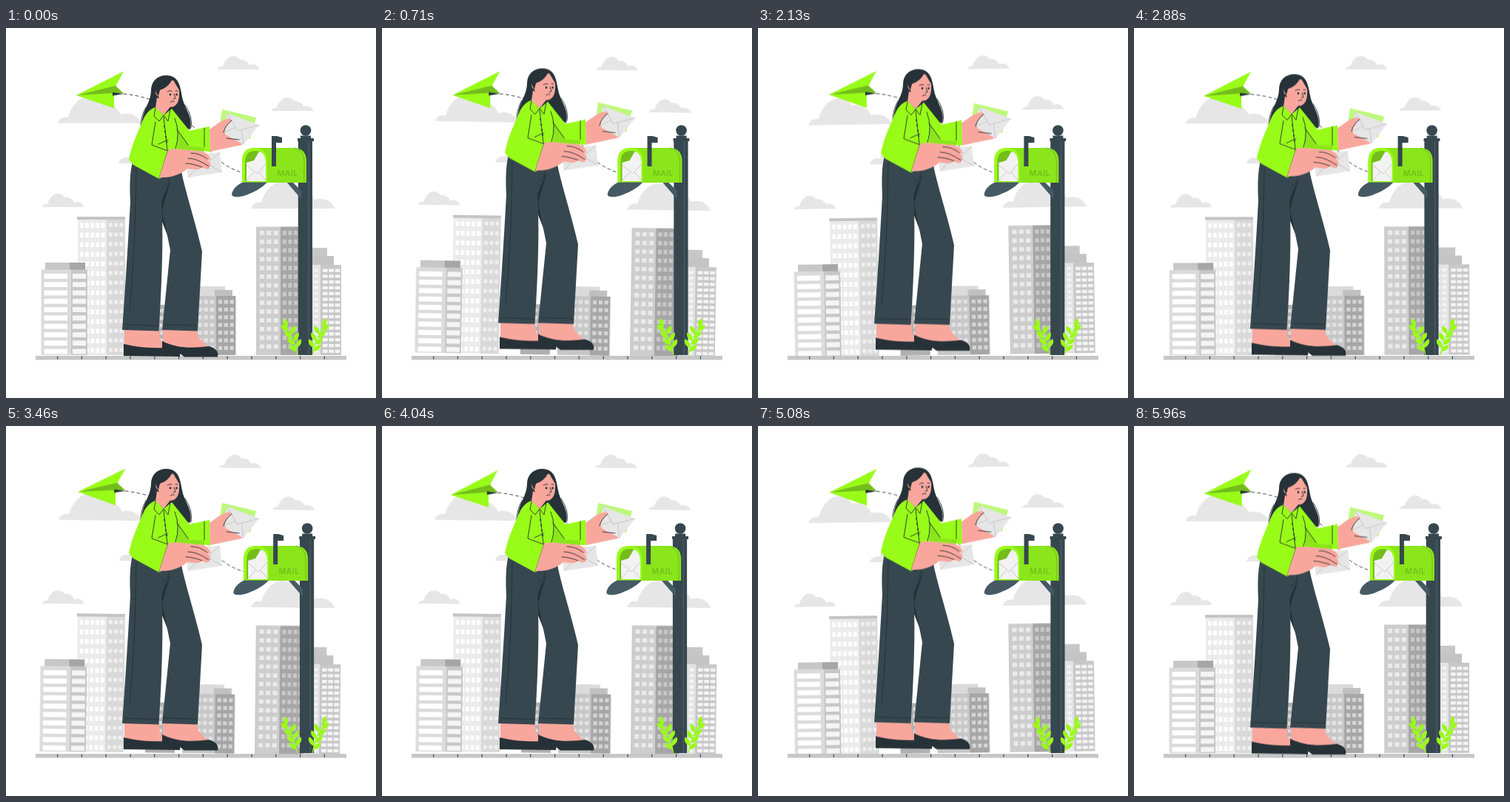
Recreate the animation shown at these times as an HTML page. Size 500 px wide and 500 px high, loop 6 s.

```html
<!DOCTYPE html>
<html lang="en">
<head>
<meta charset="utf-8">
<title>Posting letters</title>
<style>
html, body { margin: 0; width: 100%; height: 100%; overflow: hidden; background: #fff; }
svg { display: block; width: 100%; height: 100%; }
.wind, .glide { transform-origin: 250px 250px; }
.wind { animation: wind 3s linear infinite; }
.glide { animation: wind 1.5s linear infinite; }
.float { animation: float 1.5s linear infinite; }
.shake { animation: shake 6s linear infinite; }
@keyframes wind {
  0%, 100% { transform: rotate(0deg); }
  25% { transform: rotate(1deg); }
  75% { transform: rotate(-1deg); }
}
@keyframes float {
  0%, 100% { transform: translateY(0); }
  50% { transform: translateY(-10px); }
}
@keyframes shake {
  0%, 100% { transform: translateX(0); }
  10%, 90% { transform: translateX(-1px); }
  20%, 80% { transform: translateX(2px); }
  30%, 50%, 70% { transform: translateX(-4px); }
  40%, 60% { transform: translateX(4px); }
}
.lime { fill: #99fb18; }
.green { fill: #8ae51b; }
.moss { fill: #73bd1b; }
.slate { fill: #37474f; }
.steel { fill: #455a64; }
.ink { fill: #263238; }
.skin { fill: #f9a79d; }
.line { fill: none; stroke: #263238; stroke-width: .9; stroke-linecap: round; stroke-linejoin: round; }
.fold { fill: none; stroke: #c4c4c4; stroke-width: .9; }
</style>
</head>
<body>
<svg viewBox="0 0 500 500">
  <defs>
    <path id="cloud" d="M0 18C1 15 3 13.500 7 14C9 7 14 0 21 0C26 0 29 3 30 5C36 4 41 7 43 12C49 10 55 13 56.500 18Z"/>
    <path id="leaf" d="M0 0Q-6 -8 0 -14Q6 -8 0 0Z"/>
  </defs>

  <g id="clouds" class="wind" fill="#e6e6e6"></g>
  <g id="city" class="wind"></g>
  <g id="ground"></g>

  <g class="glide">
    <path class="line" stroke-dasharray="4 4" d="M159 89C208 94 248 118 268 154C280 175 298 190 322 196"/>
    <path class="lime" d="M95 91L159 58.500L148 79ZM95 91L146 85V108.500Z"/>
    <path class="moss" d="M95 91L148 78L159 88.500L145 88Z"/>
    <path class="ink" d="M144 87L159 89L144 91.500Z"/>
  </g>

  <g class="shake">
    <path class="slate" d="M394.800 150H414V442H394.800ZM394 149H416V153H394ZM398 145.500H412V149H398Z"/>
    <path d="M409 153V442" stroke="#5a6b74" stroke-width=".8"/>
    <circle class="slate" cx="405" cy="138.500" r="7.300"/>
    <path class="steel" d="M379 208H387L399 220V231Z"/>
    <path class="green" d="M319 209V180Q319 162 337 162H388Q406 162 406 180V209Z"/>
    <path fill="none" stroke="#73bd1b" d="M403 209V180Q403 166 390 162"/>
    <path class="lime" d="M319 209V180Q319 162 336 162Q353 162 353 180V209Z"/>
    <path class="moss" d="M323 207V181Q323 166 337 166Q350 166 350 181V207Z"/>
    <path fill="#f2f2f2" d="M325 182L335 179L342 167Q350 168 351 181V207H325Z"/>
    <path class="fold" d="M325 185L339 197L351 184M325 206L335 195M351 206L342 195"/>
    <path class="steel" d="M320 208.500H353C345 217 333 223 321 227C312 229 306 229 305 225C306 218 313 211 320 208.500Z"/>
    <path class="slate" d="M359 146H366L373 148V155H365V187H359Z"/>
    <text x="380.500" y="200" text-anchor="middle" font-family="Inter, Arial, sans-serif" font-size="10.500" font-weight="600" letter-spacing=".5" fill="#70c01a">MAIL</text>
  </g>

  <g id="plant" class="lime"></g>

  <g class="float">
    <!-- legs and shoes -->
    <path class="skin" d="M160 404H206.500L208 421L222 434H160ZM212 404H256L260 418L275 433L232 436L212 425Z"/>
    <path class="ink" d="M159 427C180 432 202 433 221 432C231 432 237 438 235 444L159 443Z"/>
    <path class="ink" d="M211 423C230 433 252 433 274 430C283 432 288 438 286 444.500H241C232 437 222 433 211 433Z"/>
    <path class="ink" d="M206 195L228 200L222 290L211 262Z"/>
    <path class="slate" d="M172 181L236 188C240 214 255 258 265 302L259 409.500L211 408L222 300L211 246L222 208Z"/>
    <path class="slate" d="M171 181L226 187C226 205 213 221 210 236Q214 290 206.500 409.500L157 408Q164 310 168 235Q166 200 171 181Z"/>
    <path class="line" d="M176 190Q175 300 167 380M161 401L206 402.500M214 401L258 402M221 198Q221 214 211 217"/>

    <!-- hair, neck and face -->
    <path class="ink" d="M217 64C204 64 196 72 196 85C195 103 185 108 183 132L206 128L249 137C253 119 241 109 238 93C235 76 233 65 217 64Z"/>
    <path class="line" d="M242 104Q253 120 250 135M189 107Q182 120 182 132"/>
    <path class="skin" d="M204 94L202 108L213 118L224 104Z"/>
    <path class="skin" d="M206 80C209 72 217 70 226 71C233 74 235 82 234 91C234 102 228 108 221 106.500C213 106 207 100 206 92C201 91 201 82 206 84Z"/>
    <path class="ink" d="M225 68C222 77 214 82 208 84L206 92C200 86 200 72 211 67C223 63 234 70 237 90C234 82 229 77 225 68Z"/>
    <path class="line" stroke-width="3" style="stroke-width:2.800" d="M222 90V90.100M230.500 90V90.100"/>
    <path class="line" d="M218 86Q221 84 224 85M229 85H232M227 89L229 95L226 96M222 100Q224 98.500 227 99"/>

    <!-- shirt -->
    <path class="lime" d="M202 107C193 110 188 117 184 127C177 143 170 158 166 178L172 185L207 204L228 190L236 165L276 167L275 133L248 139L224 109L213 118Z"/>
    <path class="green" d="M231 136L248 160L268 161V167L231 163Z"/>
    <path class="line" d="M202 108L200 119L207 126L213 118L219 126L222 110M202 127L197 158L221 167M206 157L219 151M219 165L207 203M228 122Q236 142 229 163M231 137L246 158M268 135V160M213 120L218 165"/>
    <path class="line" style="stroke-width:2;stroke-dasharray:.1 7" d="M214 133L217.500 156"/>

    <!-- raised hand with two letters -->
    <path fill="#bdf87b" d="M292 110L338 121L330 150L288 140Z"/>
    <path class="skin" d="M275 137L289 127L300 122L307 136L322 150C325 157 317 159 309 160L276 167Z"/>
    <g class="letter" data-corners="299 115 342 131 321 157.500 293 142"></g>
    <path class="skin" d="M284 132L292 126C298 122 305 121 305 125Q297 132 295 140L299 149L288 153Z"/>
    <path class="line" d="M305 125Q296 132 294 141M298 149L315 151"/>

    <!-- lowered hand with one letter -->
    <g class="letter" data-corners="242 172 289 168 292 195 246 202"></g>
    <path class="skin" d="M219 165C231 161 245 166 260 166C270 167 274 171 276 176C277 179 274 179 271 177C277 182 278 186 275 187C276 191 271 192 265 188C260 194 252 190 245 190C237 197 224 203 207 202Z"/>
    <path class="line" d="M250 169Q262 169 272 177M246 176Q258 176 274 187M243 183Q252 183 265 188"/>
  </g>
</svg>

<script>
const NS = "http://www.w3.org/2000/svg";
const byId = id => document.getElementById(id);

function add(parent, tag, attrs) {
  const el = document.createElementNS(NS, tag);
  for (const key in attrs) el.setAttribute(key, attrs[key]);
  parent.append(el);
}

const city = byId("city");
const BASE = 442;
const box = (x, y, width, height, fill) => add(city, "rect", { x, y, width, height, fill });

// One wall down to the ground, filled with evenly spaced windows.
function wall(x, y, width, fill, glass, { cols = 3, pitch = 12, w = .65, h = .5, pad = 3 }) {
  box(x, y, width, BASE - y, fill);
  const step = (width - pad) / cols;
  for (let top = y + 5.5; top + pitch * h < BASE; top += pitch)
    for (let c = 0; c < cols; c++) box(x + pad + c * step, top, step * w, pitch * h, glass);
}

function cloud(x, y, scale = 1) {
  add(byId("clouds"), "use", { href: "#cloud", transform: `translate(${x} ${y}) scale(${scale})` });
}
cloud(70, 93, 1.98);
cloud(286, 38);
cloud(359, 94);
cloud(49, 224);
cloud(331, 208, 2);
cloud(152, 147, 2);

// Left: tall block, then the low one in front
wall(97, 258, 39, "#ebebeb", "#fff", { cols: 5, pitch: 13 });
wall(136, 258, 25, "#d9d9d9", "#f0f0f0", { pitch: 13, h: .4 });
box(96, 255, 65, 4, "#c4c4c4");
box(53, 317, 33, 10, "#c7c7c7");
box(86, 317, 21, 10, "#a6a6a6");
wall(47.5, 326.5, 40.5, "#dbdbdb", "#fff", { cols: 1, pitch: 11.3, w: .86, h: .6, pad: 4 });
wall(88, 326.5, 22, "#c7c7c7", "#f5f5f5", { cols: 1, pitch: 11.3, w: .9, h: .6, pad: 2 });

// Behind the legs
wall(190, 374, 40, "#b0b0b0", "#dbdbdb", { cols: 5, pitch: 10 });
box(245, 349, 51, 6, "#dbdbdb");
box(245, 354, 37, 9, "#dbdbdb");
box(282, 354, 24, 9, "#c0c0c0");
wall(240, 362, 44, "#c7c7c7", "#e3e3e3", { cols: 5, pitch: 10.4 });
wall(284, 362, 26.5, "#a6a6a6", "#d6d6d6", { pitch: 10.4 });

// Right: stepped block, then the tall one
box(405, 297, 29, 12, "#c7c7c7");
box(405, 308, 38, 12, "#c4c4c4");
wall(405, 320, 20, "#e3e3e3", "#f5f5f5", { cols: 2, pitch: 7.8 });
wall(425, 320, 28, "#c7c7c7", "#f5f5f5", { pitch: 7.8, w: .8, h: .55 });
wall(338, 268.5, 33, "#cdcdcd", "#ebebeb", { pitch: 11.8, pad: 5 });
wall(371, 268.5, 33, "#a6a6a6", "#c9c9c9", { cols: 4, pitch: 11.8 });

const ground = byId("ground");
add(ground, "rect", { x: 40, y: 443, width: 420, height: 5.5, fill: "#c7c7c7" });
for (let x = 69; x < 460; x += 32.8)
  add(ground, "rect", { x, y: 443.5, width: 1.2, height: 4, fill: "#37474f" });

// A bent stem with leaves on alternate sides; side 1 leans left, -1 right.
function sprig(x, y, side) {
  const sway = k => -side * 17 * k ** 1.5;
  const root = `translate(${x} ${y})`;
  add(plant, "path", {
    d: `M0 0Q${-side * 4} -22 ${sway(1)} -41`, transform: root,
    fill: "none", stroke: "#99fb18", "stroke-width": 1.3
  });
  for (let i = 0; i < 8; i++) {
    const k = .12 + i * .11;
    const angle = i === 7 ? -side * 15 : (i % 2 ? 1 : -1) * side * 40 - side * 12;
    add(plant, "use", {
      href: "#leaf",
      transform: `${root} translate(${sway(k)} ${-41 * k}) rotate(${angle})`
    });
  }
}
const plant = byId("plant");
sprig(394, 442, 1);
sprig(414, 442, -1);

// Letters: four corners, with the folds meeting near the middle.
for (const letter of document.querySelectorAll(".letter")) {
  const n = letter.dataset.corners.split(" ").map(Number);
  const [a, b, c, d] = [0, 2, 4, 6].map(i => [n[i], n[i + 1]]);
  const mix = (p, q, k) => p.map((v, i) => v + (q[i] - v) * k);
  const tip = mix(mix(a, b, .5), mix(c, d, .5), .6);
  add(letter, "path", { d: `M${a}L${b}L${c}L${d}Z`, fill: "#e6e6e6" });
  add(letter, "path", {
    d: `M${a}L${tip}L${b}M${d}L${mix(a, tip, .8)}M${c}L${mix(b, tip, .8)}`, class: "fold"
  });
}
</script>
</body>
</html>
```
